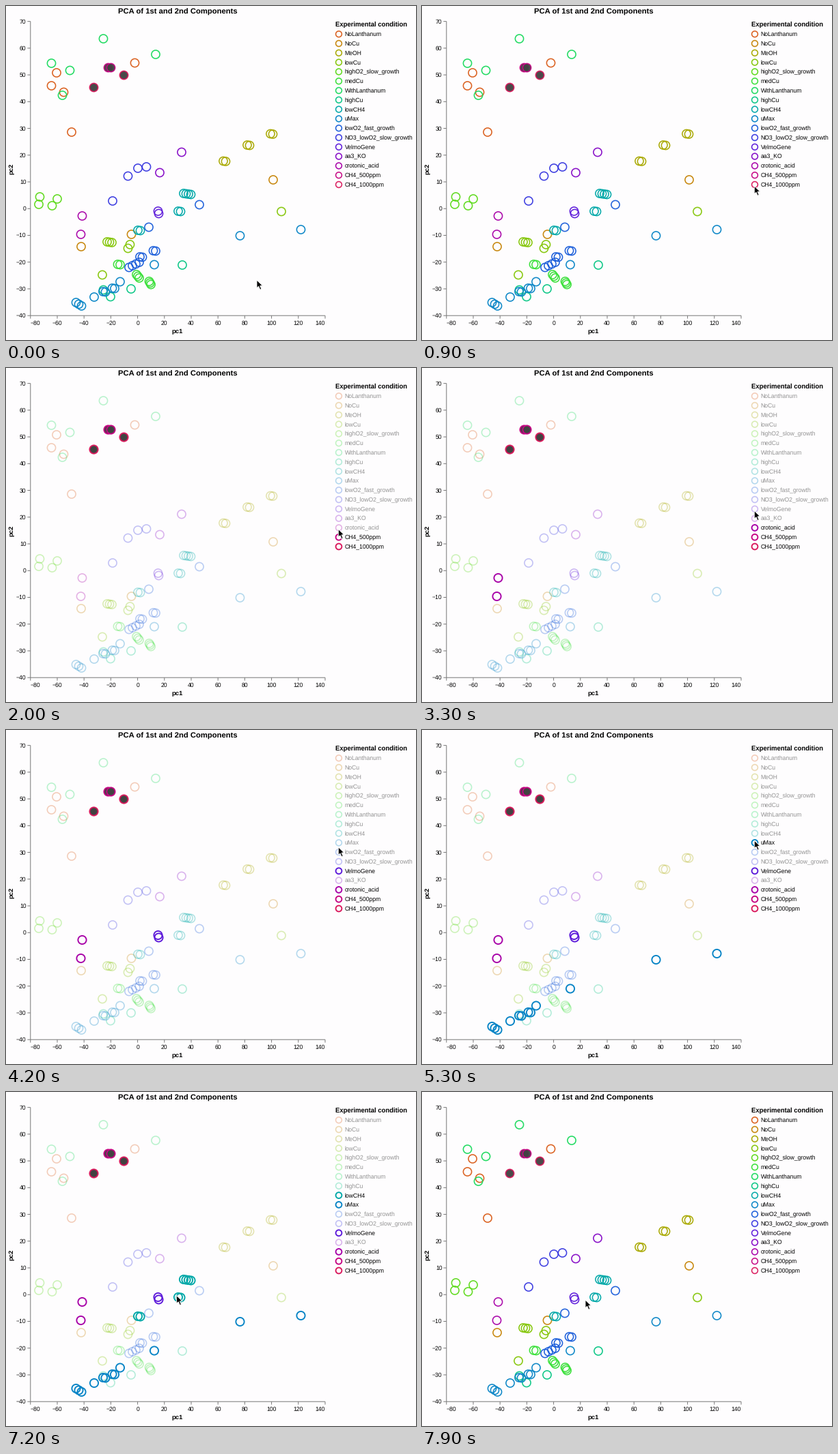
Animation of 600x490 px, one loop 8000 ms. Source, as a matplotlib script:

```python
import numpy as np
import matplotlib.pyplot as plt
from matplotlib.animation import FuncAnimation
from matplotlib.patches import Polygon

W, H, DPI = 600, 490, 100
FRAMES, STEP = 80, 100
PX = 72 / DPI
LEFT, RIGHT, TOP, BOTTOM = 35.8, 467, 22.6, 454.2
ROW_X, ROW_Y, ROW_GAP = 487, 41.2, 13.8

plt.rcParams["font.family"] = "Liberation Sans"
plt.rcParams["text.hinting"] = "none"

# Each cluster is x, y and, for replicates, a count and a step (dx, dy)
GROUPS = {
    "NoLanthanum": [(74, 98), (66.5, 117), (84.5, 126.5), (96, 185), (188.5, 83.5)],
    "NoCu": [(391, 255), (183.5, 335), (110, 353)],
    "MeOH": [(318, 227.5, 2), (353, 204, 2), (387, 187.5, 2)],
    "lowCu": [(403, 301.5), (148, 346, 3), (178.5, 355.5), (181.5, 350), (141, 394.5)],
    "highO2_slow_growth": [(49.5, 280), (48, 291), (67.5, 293), (75, 283)],
    "medCu": [(163.5, 379, 2), (191, 394, 3, 2, 2.5), (209.5, 404, 3, 1.3, 2.3)],
    "WithLanthanum": [(142.5, 48), (219, 71), (66.5, 84), (93.5, 94.5), (82.5, 131)],
    "highCu": [(258, 380), (183, 415), (153, 426.5), (142.5, 416.5)],
    "lowCH4": [(260, 275, 4), (252, 301, 2), (193, 329, 2)],
    "uMax": [(342.5, 337), (431.5, 328), (217, 379.5), (167, 404.5),
             (155.5, 414, 2), (142, 419, 2), (129, 427), (102.5, 435, 3, 4, 2.5)],
    "lowO2_fast_growth": [(283, 291.5), (209, 324.5), (215.5, 359, 2),
                          (196, 368, 2), (180, 383.5, 4, 5, -2.5)],
    "NO3_lowO2_slow_growth": [(193, 238), (205.5, 236), (178.5, 249.5), (156, 286)],
    "VelmoGene": [(222.5, 301, 2, 1, 3.5)],
    "aa3_KO": [(257, 214.5), (225, 244.5)],
    "crotonic_acid": [(111.5, 308), (109.5, 335)],
    "CH4_500ppm": [(149, 90, 2)],
    "CH4_1000ppm": [(172, 101), (127.5, 119)],
}

# Click time in ms: legend row it adds
CLICKS = {1100: 16, 1600: 15, 2200: 14, 3700: 12, 4600: 9, 6400: 8}
CLEAR = 7600
START, END = (367, 402), (239, 305)
LEAD, REST = 300, 100  # pause before and after each click

ARROW = np.array([(0, 0), (0, 11.8), (2.7, 9.3), (4.8, 14.2),
                  (6.9, 13.3), (4.8, 8.5), (8.4, 8.2)])


def sinebow(t):
    phase = np.pi * (0.5 - t + np.arange(3) / 3)
    return tuple(0.88 * np.sin(phase) ** 2)


def spread(x, y, n=1, dx=3.5, dy=0.5):
    return [(x + k * dx, y + k * dy) for k in range(n)]


def row_y(i):
    return ROW_Y + ROW_GAP * i


def label(x, y, s, size=8.7, **kw):
    return ax.text(x, y, s, fontsize=size * PX, va="baseline", **kw)


def line(xs, ys):
    ax.plot(xs, ys, color="#777777", lw=PX, solid_capstyle="butt", snap=False)


def rings(points, radius, color, fill="none"):
    x, y = zip(*points)
    return ax.scatter(x, y, s=(2 * radius * PX) ** 2,
                      facecolors=fill, edgecolors=[color])


def num(v):
    return str(v).replace("-", "\u2212")


def draw_axes():
    line([LEFT, LEFT], [TOP, BOTTOM])
    line([LEFT, RIGHT], [BOTTOM, BOTTOM])
    for v in range(-80, 141, 20):
        x = LEFT + (v + 80) / 220 * (RIGHT - LEFT)
        line([x, x], [BOTTOM, BOTTOM + 4.4])
        side = {-80: "left", 140: "right"}.get(v, "center")
        label(x, 467.9, num(v), ha=side)
    for v in range(-40, 71, 10):
        y = BOTTOM - (v + 40) / 110 * (BOTTOM - TOP)
        line([LEFT - 4.4, LEFT], [y, y])
        label(29.6, y + 2.9, num(v), ha="right")
    label(251, 12.2, "PCA of 1st and 2nd Components", 11.2, weight="bold", ha="center")
    label(251, 480.5, "pc1", 9.5, weight="bold", ha="center")
    label(10.3, 238.5, "pc2", 9.5, weight="bold", ha="center",
          rotation=90, rotation_mode="anchor")
    label(482, 30.3, "Experimental condition", 9.55, weight="bold")


def cursor_at(ms):
    """Glide from click to click, resting around each one."""
    times = [0, *CLICKS, CLEAR]
    spots = [START, *((ROW_X - 0.7, row_y(i) + 2) for i in CLICKS.values()), END]
    for i, (t0, t1) in enumerate(zip(times, times[1:])):
        if ms < t1:
            k = np.clip((ms - t0 - REST) / (t1 - t0 - REST - LEAD), 0, 1)
            k = k * k * (3 - 2 * k)
            return (1 - k) * np.array(spots[i]) + k * np.array(spots[i + 1])
    return np.array(END)


fig = plt.figure(figsize=(W / DPI, H / DPI), dpi=DPI, facecolor="#fefdfe")
ax = fig.add_axes([0, 0, 1, 1])
ax.axis("off")
draw_axes()

rows = []
for i, (name, clusters) in enumerate(GROUPS.items()):
    color = sinebow((i + 1) / (len(GROUPS) + 1))
    points = [p for c in clusters for p in spread(*c)]
    fill = "#424242" if name.startswith("CH4") else "none"
    rows.append((rings(points, 6.1, color, fill),
                 rings([(ROW_X, row_y(i))], 4.4, color),
                 label(495.7, row_y(i) + 2.9, name)))

ax.set_xlim(0, W)
ax.set_ylim(H, 0)
arrow = ax.add_patch(Polygon(ARROW, facecolor="black", edgecolor="white",
                             lw=0.9 * PX, zorder=10))


def update(frame):
    ms = frame * STEP
    chosen = {row for t, row in CLICKS.items() if t <= ms < CLEAR}
    for i, (dots, key, text) in enumerate(rows):
        if not chosen:
            alpha, width, ink = 0.96, 1.6, "black"
        elif i in chosen:
            alpha, width, ink = 1, 1.9, "black"
        else:
            alpha, width, ink = 0.3, 1.6, "#939393"
        for ring in (dots, key):
            ring.set_alpha(alpha)
            ring.set_linewidth(width * PX)
        text.set_color(ink)
    arrow.set_xy(ARROW + cursor_at(ms))
    return []


anim = FuncAnimation(fig, update, frames=FRAMES, interval=STEP,
                     repeat=True, repeat_delay=0, blit=False)
plt.show()
```
